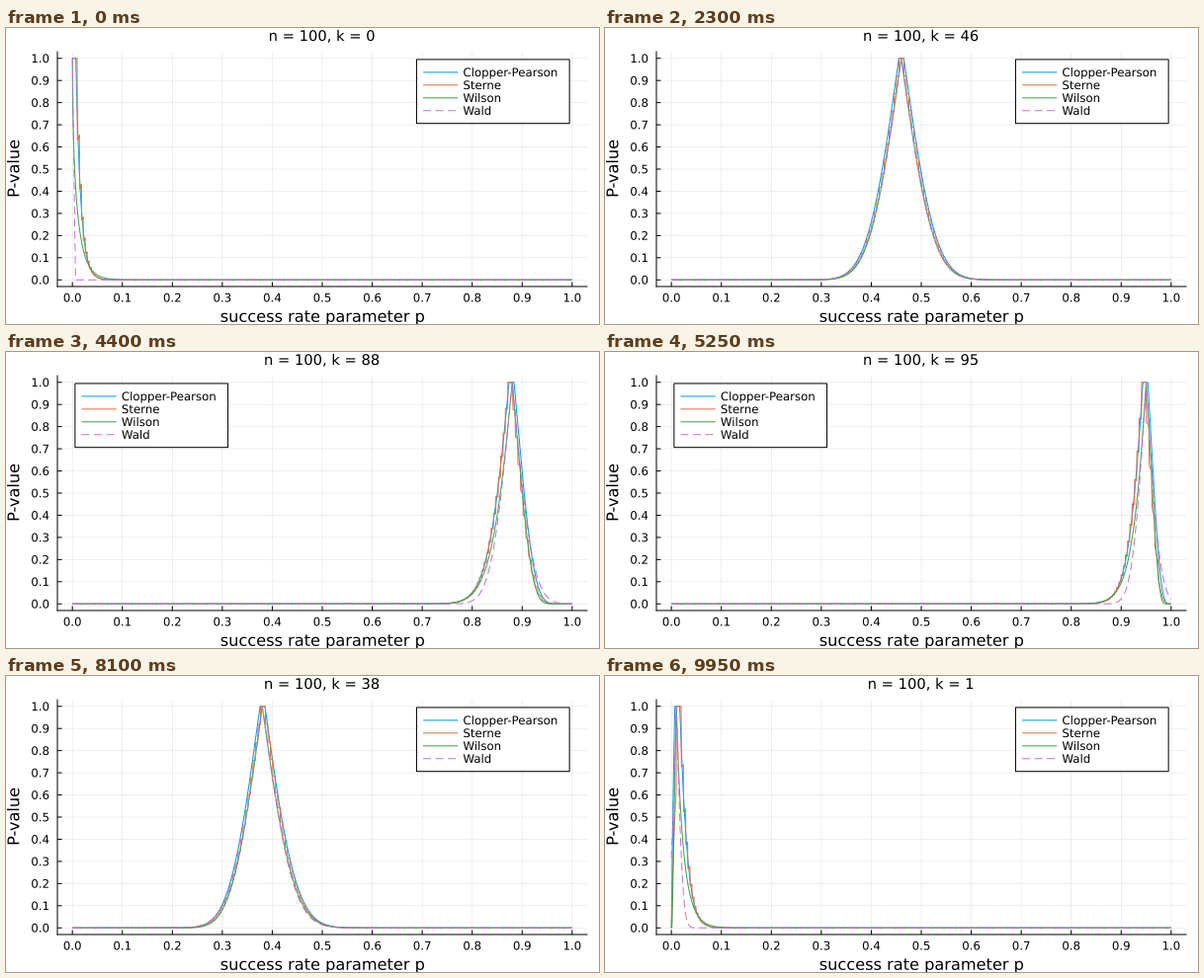
Write a matplotlib script that moves like this. It is 600x300 px and loops after 10000 ms.

```python
import math

import numpy as np
import matplotlib.pyplot as plt
from matplotlib.animation import FuncAnimation
from matplotlib.patches import Rectangle
from matplotlib.patheffects import Normal

plt.rcParams.update({"font.family": "DejaVu Sans", "text.hinting": "none",
                     "lines.scale_dashes": False})

W, H, DPI = 600, 300, 100
PX = 72 / DPI               # one pixel in points
FONT = 1.47 * PX            # plot font unit in points
LEFT, RIGHT, TOP, BOTTOM = 52, 588, 24, 262
INSET = 1 / 30              # legend distance from the plot edge
ROW = 12.95                 # legend row height
BOX_W, BOX_H = 154.7, 5 * ROW
N = 100

NAMES = ["Clopper-Pearson", "Sterne", "Wilson", "Wald"]
COLORS = ["#009afa", "#e36f47", "#3ea44e", "#c371d2"]

# Binomial probabilities for every count (rows) and parameter (columns)
p = np.linspace(0, 1, 2001)
counts = np.arange(N + 1)
choose = np.array([float(math.comb(N, j)) for j in counts])[:, None]
pmf = choose * p ** counts[:, None] * (1 - p) ** (N - counts[:, None])
cdf = np.cumsum(pmf, axis=0)
sf = np.cumsum(pmf[::-1], axis=0)[::-1]
erfc = np.vectorize(math.erfc, otypes=[float])


def to_x(v):
    return LEFT + (RIGHT - LEFT) * (v + 0.03) / 1.06


def to_y(v):
    return BOTTOM - (BOTTOM - TOP) * (v + 0.03) / 1.06


def clopper_pearson(k):
    return np.minimum(1, 2 * np.minimum(cdf[k], sf[k]))


def sterne(k):
    return np.where(pmf <= pmf[k] * (1 + 1e-9), pmf, 0).sum(axis=0)


def normal_test(k, var):
    diff = np.abs(k - N * p)
    z = diff / np.sqrt(np.maximum(var, 1e-12))
    return erfc(z / math.sqrt(2))


def wilson(k):
    return normal_test(k, N * p * (1 - p))


def wald(k):
    if k in (0, N):         # zero variance: a single steep segment
        return np.clip(1 - np.abs(p - k / N) / 0.00625, 0, 1)
    return normal_test(k, k * (1 - k / N))


METHODS = [clopper_pearson, sterne, wilson, wald]

fig = plt.figure(figsize=(W / DPI, H / DPI), dpi=DPI, facecolor="white")
ax = fig.add_axes([0, 0, 1, 1])
ax.set_xlim(0, W)
ax.set_ylim(H, 0)
ax.axis("off")


def line(xs, ys, color="black", width=1.0, **kw):
    return ax.plot(xs, ys, color=color, lw=width * PX, snap=False, **kw)[0]


def label(x, y, s, size, ha="center", **kw):
    # The path effect draws outlines, so text sits at subpixel positions
    return ax.text(x, y, s, fontsize=size * FONT, ha=ha, va="baseline",
                   path_effects=[Normal()], **kw)


def style(i):
    dashed = {"dashes": (8 * PX, 4.5 * PX)} if i == 3 else {}
    return dict(color=COLORS[i], dash_capstyle="butt",
                solid_capstyle="butt", **dashed)


for i in range(11):
    x, y = to_x(i / 10), to_y(i / 10)
    line([x, x], [TOP, BOTTOM], alpha=0.1, width=0.6)
    line([LEFT, RIGHT], [y, y], alpha=0.1, width=0.6)
    line([x, x], [BOTTOM, BOTTOM - 4.5], solid_capstyle="butt")
    line([LEFT, LEFT + 4.5], [y, y], solid_capstyle="butt")
    label(x, 277.5, f"{i / 10:.1f}", 8)
    label(44, y + 4.3, f"{i / 10:.1f}", 8, ha="right")
line([LEFT, RIGHT], [BOTTOM, BOTTOM])
line([LEFT, LEFT], [TOP, BOTTOM])

label(320, 297.8, "success rate parameter p", 11)
label(13.3, 142.5, "P-value", 11, rotation=90, rotation_mode="anchor")
title = label(319.8, 13, "", 10)

curves = [line([], [], zorder=3, **style(i)) for i in range(4)]

box_top = TOP + (BOTTOM - TOP) * INSET
box = Rectangle((0, box_top), BOX_W, BOX_H, fc="white", ec="black", lw=PX,
                zorder=4, snap=False)
ax.add_patch(box)
rows = [box_top + ROW * (i + 1) for i in range(4)]
keys = [line([], [], zorder=5, **style(i)) for i in range(4)]
texts = [label(0, y + 4.2, name, 8, ha="left", zorder=5)
         for name, y in zip(NAMES, rows)]


def place_legend(on_right):
    gap = (RIGHT - LEFT) * INSET
    x = RIGHT - gap - BOX_W if on_right else LEFT + gap
    box.set_x(x)
    for key, text, y in zip(keys, texts, rows):
        key.set_data([x + 6.6, x + 41.9], [y, y])
        text.set_x(x + 47)


def draw(frame):
    k = N - abs(N - frame)
    title.set_text(f"n = {N}, k = {k}")
    for curve, method in zip(curves, METHODS):
        curve.set_data(to_x(p), to_y(method(k)))
    place_legend(k < N / 2)
    return [title, box, *curves, *keys, *texts]


anim = FuncAnimation(fig, draw, frames=2 * N, interval=50, repeat=True,
                     repeat_delay=0, blit=False)
plt.show()
```
